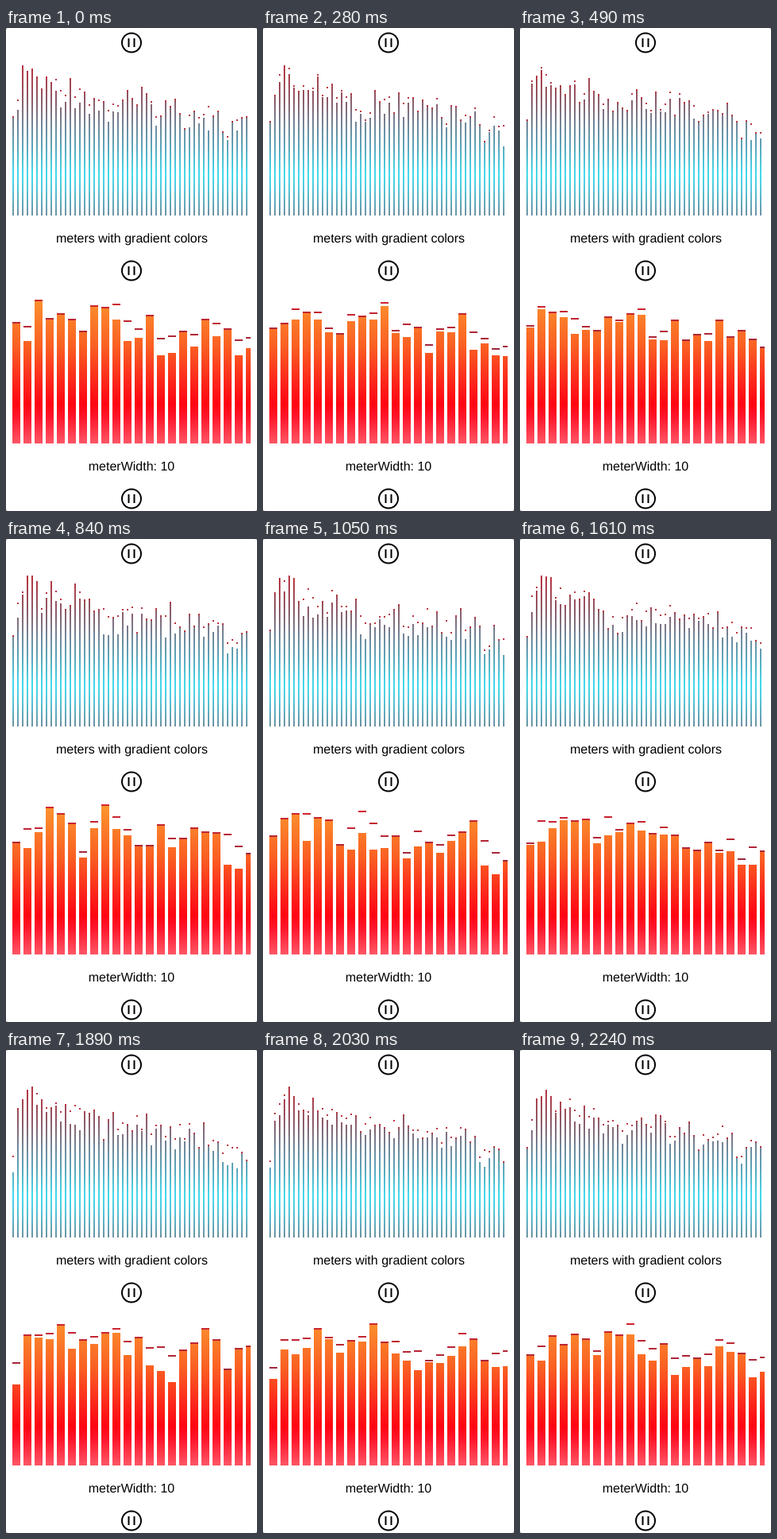
These frames come from a looping animation (316x608 px, 2.31 s). An HTML page with a canvas:

```html
<!DOCTYPE html>
<html>
<head>
<meta charset="utf-8">
<style>
  html, body { margin: 0; width: 100%; height: 100%; overflow: hidden; }
  html { background: #999; }
  body { background: #fff; border-radius: 3px; }
  svg, canvas { position: absolute; left: 0; top: 0; }
  text {
    font: 16px "Liberation Sans", Arial, sans-serif;
    text-anchor: middle;
    text-rendering: geometricPrecision;
  }
</style>
</head>
<body>
<svg width="316" height="608">
  <defs>
    <g id="pause" fill="none" stroke="#000" stroke-width="2">
      <circle r="12"/>
      <path d="M-3.5-5.5v11M3.5-5.5v11"/>
    </g>
  </defs>
  <use href="#pause" x="158" y="18.5"/>
  <use href="#pause" x="158" y="305.5"/>
  <use href="#pause" x="158" y="592.5"/>
  <text x="158.5" y="270">meters with gradient colors</text>
  <text x="158" y="557">meterWidth: 10</text>
</svg>
<canvas width="316" height="608"></canvas>
<script>
const STEP = 70, STEPS = 33, BEAT = 3, FALL = 2.8;
const ctx = document.querySelector("canvas").getContext("2d");
const mix = (a, b, t) => a + (b - a) * t;

function noise(i, s) {
  const v = Math.sin(i * 12.9898 + s * 78.233) * 43758.5453;
  return v - Math.floor(v);
}

// Seeded wobble from -1 to 1 that moves to a new value every beat and loops.
function wobble(i, step) {
  const beat = Math.floor(step / BEAT);
  const next = (beat + 1) % (STEPS / BEAT);
  return mix(noise(i, beat), noise(i, next), step % BEAT / BEAT) * 2 - 1;
}

// Height at bar i on the line through a few [bar, y] points.
function along(points, i) {
  const k = Math.max(1, points.findIndex(p => p[0] >= i));
  const [x0, y0] = points[k - 1], [x1, y1] = points[k];
  return mix(y0, y1, (i - x0) / (x1 - x0));
}

function gradient(stops) {
  const top = stops[0][0], bottom = stops[stops.length - 1][0];
  const g = ctx.createLinearGradient(0, top, 0, bottom);
  for (const [y, color] of stops) g.addColorStop((y - top) / (bottom - top), color);
  return g;
}

// Bars wobble about the spectrum; caps are pushed up by them and sink slowly.
function simulate({ spectrum, count, swing, ceiling }) {
  const bars = Array.from({ length: STEPS }, (_, s) =>
    Array.from({ length: count }, (_, i) =>
      Math.max(ceiling, along(spectrum, i) + swing * wobble(i, s))));
  const caps = [];
  let cap = bars[0];
  for (let n = 0; n < STEPS * 2; n++) {
    cap = bars[n % STEPS].map((y, i) => Math.min(y, cap[i] + FALL));
    caps[n % STEPS] = cap;
  }
  return { bars, caps };
}

const meters = [
  {
    count: 50, width: 2, pitch: 6, base: 236, ceiling: 47, swing: 23,
    spectrum: [[0, 135], [1, 84], [3, 52], [7, 77], [14, 79], [20, 106], [23, 95], [41, 109], [45, 127], [49, 130]],
    fill: gradient([
      [45, "#bc303c"], [90, "#8e5a67"], [120, "#738496"],
      [150, "#5ba6ba"], [184, "#42dbed"], [202, "#52c7da"], [236, "#6d91a1"]
    ]),
    capFill: "#b93541"
  },
  {
    count: 22, width: 10, pitch: 14, base: 523, ceiling: 335, swing: 27,
    spectrum: [[0, 398], [1, 371], [3, 363], [6, 375], [8, 361], [11, 373], [14, 392], [17, 371], [20, 398], [21, 400]],
    fill: gradient([
      [333, "#fb982f"], [400, "#fa6023"], [445, "#fc271b"], [474, "#ff0512"], [490, "#ff162b"], [523, "#ff5666"]
    ]),
    capFill: gradient([[333, "#d8222b"], [375, "#b82634"], [420, "#8f2640"]])
  }
].map(meter => ({ ...meter, ...simulate(meter) }));

function draw(now) {
  const step = Math.floor(now / STEP) % STEPS;
  ctx.clearRect(0, 0, 316, 608);
  ctx.save();
  ctx.beginPath();
  ctx.rect(8, 0, 300, 608);
  ctx.clip();
  for (const { bars, caps, width, pitch, base, fill, capFill } of meters) {
    ctx.fillStyle = fill;
    bars[step].forEach((y, i) => ctx.fillRect(8 + i * pitch, Math.round(y), width, base - Math.round(y)));
    ctx.fillStyle = capFill;
    caps[step].forEach((y, i) => ctx.fillRect(8 + i * pitch, Math.round(y) - 1, width, 2));
  }
  ctx.restore();
}

const start = performance.now();
(function loop() {
  draw(performance.now() - start);
  requestAnimationFrame(loop);
})();
</script>
</body>
</html>
```
